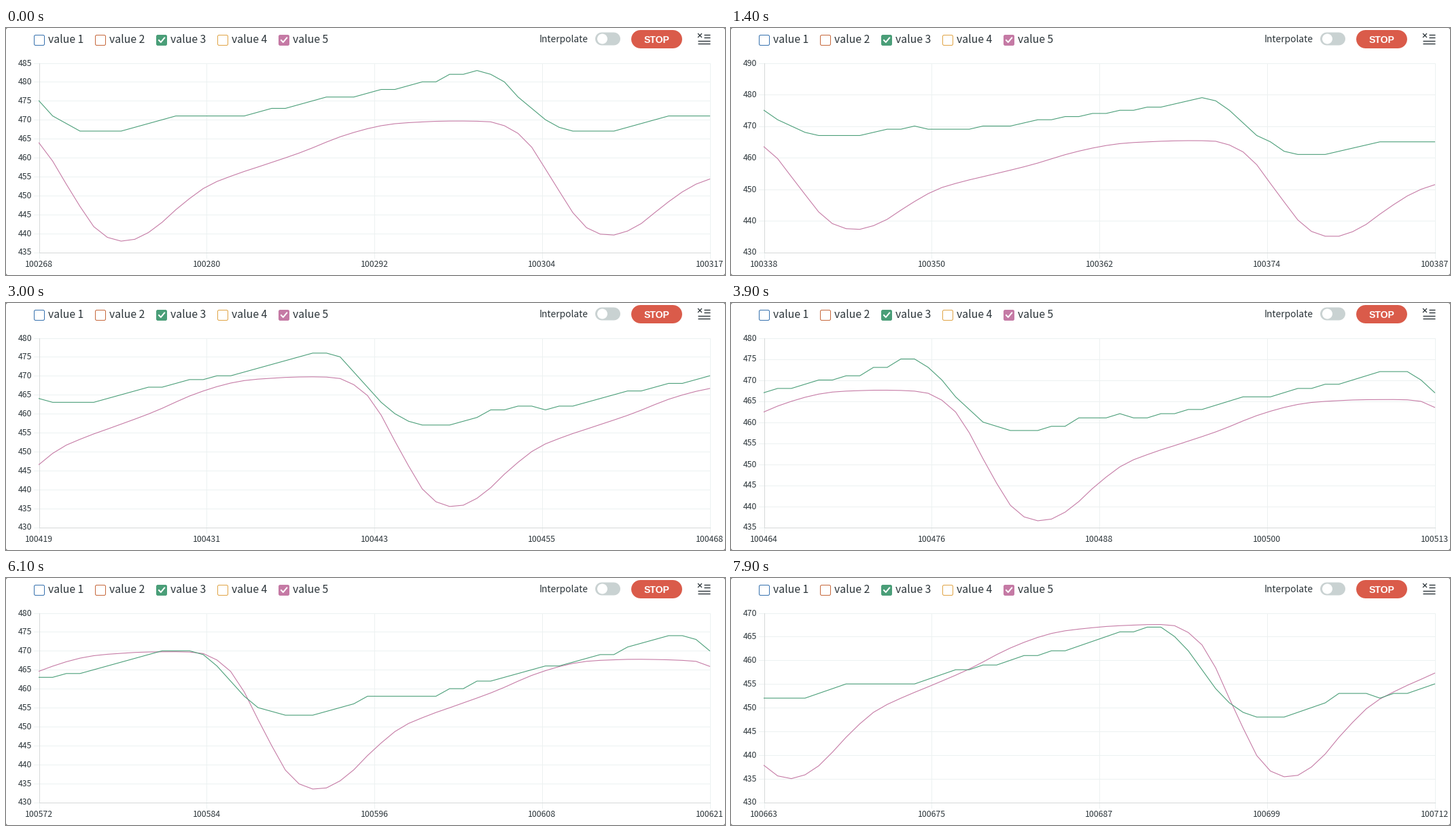
Write a matplotlib script that moves like this. It is 1058 px wide and 364 px high and loops after 8 s.

```python
import numpy as np
import matplotlib.pyplot as plt
from matplotlib.animation import FuncAnimation
from matplotlib.patches import Circle, FancyBboxPatch

W, H, DPI = 1058, 364, 100
PT = 72 / DPI                      # points per pixel
LEFT, RIGHT, TOP, BOTTOM = 48.5, 1035.5, 51.5, 330.5
POINTS, TICK = 50, 8
FRAMES, INTERVAL = 80, 100
FIRST, LAST, OFFSET = 268, 712, 100000

INK, GRID, BORDER = "#2c353a", "#ecf1f1", "#d6d9d9"
BLUE, RUST, GREEN, AMBER, PINK = "#3671ae", "#c6683c", "#4a9e78", "#e0a445", "#c57aa5"

plt.rcParams["font.family"] = "Noto Sans CJK JP"


def curve(x, *keys):
    """Smooth cubic curve through a few (x, y) key points."""
    kx, ky = np.array(keys, float).T
    slope = np.gradient(ky, kx)
    i = np.clip(np.searchsorted(kx, x, side="right") - 1, 0, len(kx) - 2)
    h = kx[i + 1] - kx[i]
    t = (x - kx[i]) / h
    return ((1 + 2*t) * (1 - t)**2 * ky[i] + t * (1 - t)**2 * h * slope[i]
            + t*t * (3 - 2*t) * ky[i + 1] + t*t * (t - 1) * h * slope[i + 1])


def level(x, *keys):
    """Straight lines through a few (x, y) key points."""
    kx, ky = np.array(keys, float).T
    return np.interp(x, kx, ky)


# Pulse: each beat repeats one shape, timed from the bottom of its dip
sample = np.arange(FIRST, LAST + 1)
LEAD = 10
beats = level(np.arange(13), (0, 274.2), (1, 309.7), (6, 484.2), (9, 592.3), (12, 701.3))
beat = np.searchsorted(beats - LEAD, sample, side="right") - 1
phase = sample - beats[beat]


def smooth_signal():
    shape = curve(phase, (-10, 1), (-8, .975), (-6, .82), (-4, .45), (-2, .1), (0, 0),
                  (2, .085), (4, .28), (6, .45), (8, .545), (10, .62), (13, .735),
                  (16, .87), (19, .96), (22, .99), (27, 1))
    low = level(sample, (274, 437.9), (310, 439.5), (379, 434.9), (449, 435.4),
                (484, 436.5), (556, 434.8), (628, 432), (665, 435), (701, 435.3))
    high = 467.6 - 2.2 * np.cos(2 * np.pi * (sample - 365) / 145)
    return low + (high - low) * shape


def stepped_signal():
    shape = curve(phase, (-10, 1), (-9, .98), (-8, .86), (-6, .43), (-4, .1), (-2, 0),
                  (0, .02), (4, .24), (8, .25), (13, .46), (18, .65), (22, .8),
                  (25, .97), (27, 1))
    low = level(sample, (274, 467), (343, 467), (379, 461), (449, 457),
                (482, 458), (556, 451), (626, 455), (700, 448))
    high = level(sample, (300, 483), (370, 479), (475, 475), (547, 470),
                 (583, 470.5), (620, 474.3), (655, 469), (691, 467))
    jitter = np.random.default_rng(4).uniform(-.25, .25, len(sample))
    return np.round(low + (high - low) * shape + jitter)


green_data, pink_data = stepped_signal(), smooth_signal()


def nice(step):
    """Round a step up to 1, 2, 5 or 10 times a power of ten."""
    base = 10 ** np.floor(np.log10(step))
    return base * next(m for m in (1, 2, 5, 10) if step / base <= m)


def value_ticks(low, high, most=10):
    grace = 0.025 * (high - low)
    low, high = low - grace, high + grace
    step = nice((high - low) / most)
    count = np.ceil(high / step) - np.floor(low / step)
    if count > most:
        step = nice(count * step / most)
    start, stop = np.floor(low / step), np.ceil(high / step)
    return np.arange(start, stop + 1) * step


fig = plt.figure(figsize=(W / DPI, H / DPI), dpi=DPI, facecolor="#777777")
ax = fig.add_axes([0, 0, 1, 1])
ax.set_xlim(0, W)
ax.set_ylim(H, 0)
ax.axis("off")


def line(x, y, color, width=1.0, z=2, **kw):
    return ax.plot(x, y, color=color, lw=width * PT, zorder=z, **kw)[0]


def label(x, y, text, size, ha="left", **kw):
    kw.setdefault("color", INK)
    return ax.text(x, y, text, fontsize=size * PT, ha=ha, va="baseline", zorder=6, **kw)


def box(x, y, w, h, radius, face, edge="none", z=4):
    style = f"round,pad=0,rounding_size={radius}"
    ax.add_patch(FancyBboxPatch((x, y), w, h, boxstyle=style, fc=face, ec=edge,
                                lw=PT if edge != "none" else 0, zorder=z))


def pill(x, y, w, h, color):
    line([x + h / 2, x + w - h / 2], [y + h / 2] * 2, color, h, z=4,
         solid_capstyle="round", snap=False)


def draw_toolbar():
    for n, color in enumerate((BLUE, RUST, GREEN, AMBER, PINK)):
        x = 41.5 + 90 * n
        checked = color in (GREEN, PINK)
        box(x, 10.5, 15, 15, 2, color if checked else "white", color)
        if checked:
            line([x + 3.5, x + 6.3, x + 11.7], [18, 21, 14.5], "white", 2, z=5)
        label(x + 20.5, 22, f"value {n + 1}", 15.8)

    label(785, 21.5, "Interpolate", 13.8)
    pill(867, 6.5, 37, 19, "#c9d2d2")
    ax.add_patch(Circle((877.5, 16), 7.5, fc="white", lw=0, zorder=5))
    pill(920, 3, 75, 27, "#da5b4a")
    label(957.5, 21.5, "STOP", 14, "center", color="white",
          weight="bold", family="Liberation Sans")

    for x, y in ((1027, 9.5), (1027, 14), (1018, 18.5), (1018, 23)):
        line([x, 1036], [y, y], INK, 1.4, solid_capstyle="butt")
    line([1018.5, 1023.5], [8.5, 13.5], INK, 1.3)
    line([1018.5, 1023.5], [13.5, 8.5], INK, 1.3)


box(0, 0, W, H, 3, "white", z=0)
draw_toolbar()

# Sample axis: a tick every 12 samples, plus the last one
x_points = np.linspace(LEFT, RIGHT, POINTS)
x_ticks = [0, 12, 24, 36, 49]
x_anchor = np.linspace(LEFT, RIGHT, len(x_ticks))
for x in x_anchor:
    line([x, x], [TOP, BOTTOM + TICK], GRID, z=1)
x_labels = [label(x, 352.3, "", 12.3, "center") for x in x_anchor]

y_lines = [line([], [], GRID, z=1) for _ in range(11)]
y_labels = [label(38, 0, "", 12.3, "right") for _ in range(11)]
line([LEFT, LEFT], [TOP, BOTTOM], BORDER)
line([LEFT, RIGHT], [BOTTOM, BOTTOM], BORDER)

pink_line = line([], [], PINK, 1.1, z=3)
green_line = line([], [], GREEN, 1.1, z=3.5)


def draw(frame):
    start = int(np.round(level(frame, (0, 268), (39, 464), (52, 527), (79, 663))))
    view = slice(start - FIRST, start - FIRST + POINTS)
    green, pink = green_data[view], pink_data[view]
    ticks = value_ticks(min(green.min(), pink.min()), max(green.max(), pink.max()))

    def to_y(value):
        return BOTTOM - (value - ticks[0]) / (ticks[-1] - ticks[0]) * (BOTTOM - TOP)

    green_line.set_data(x_points, to_y(green))
    pink_line.set_data(x_points, to_y(pink))
    for text, n in zip(x_labels, x_ticks):
        text.set_text(str(OFFSET + start + n))
    for n, (grid, text) in enumerate(zip(y_lines, y_labels)):
        shown = n < len(ticks)
        grid.set_visible(shown)
        text.set_visible(shown)
        if shown:
            y = to_y(ticks[n])
            grid.set_data([LEFT - TICK, RIGHT], [y, y])
            text.set_y(y + 4)
            text.set_text(f"{ticks[n]:.0f}")
    return green_line, pink_line


anim = FuncAnimation(fig, draw, frames=FRAMES, interval=INTERVAL,
                     repeat=True, repeat_delay=0)
plt.show()
```
